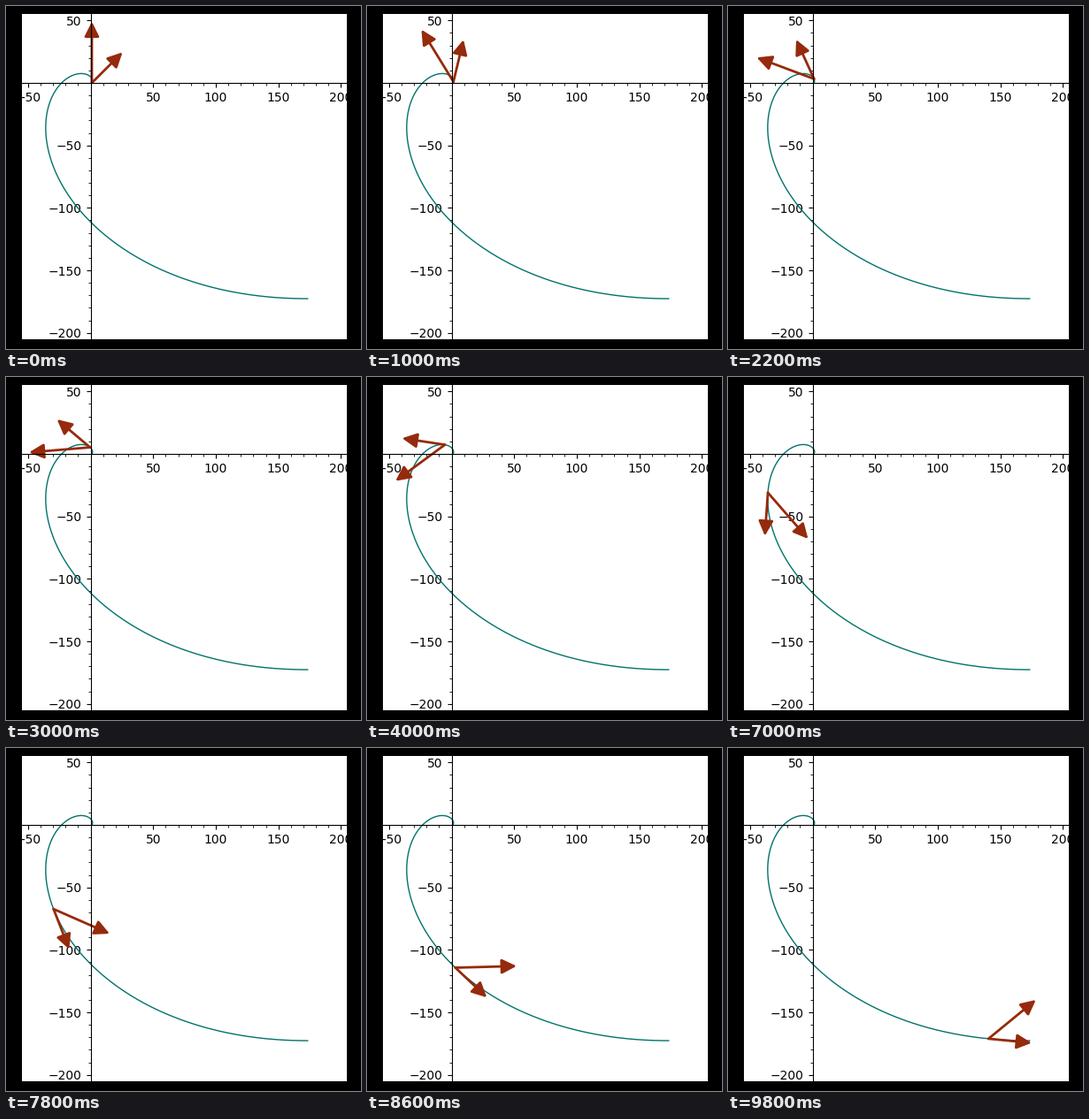
A matplotlib script for the animation above (10 s loop, 401x388 px).

```python
import numpy as np
import matplotlib.pyplot as plt
from matplotlib.animation import FuncAnimation
from matplotlib.patches import FancyArrowPatch
from matplotlib.ticker import FixedLocator, MultipleLocator

W, H, DPI = 401, 388, 100
FRAMES, INTERVAL = 50, 200
T_END, T_LAST = 5.5, 5.4
ARROW_SCALE = np.exp(T_END) / 10
CURVE_COLOR = "#00736b"
ARROW_COLOR = "#962a0c"

plt.rcParams["font.family"] = "DejaVu Sans"


def spiral(t):
    """Logarithmic spiral as a complex number."""
    return np.exp((1 + 1j) * t)


fig = plt.figure(figsize=(W / DPI, H / DPI), dpi=DPI, facecolor="black")
left, top, side = 17.8, 9.2, 367.6
ax = fig.add_axes([left / W, 1 - (top + side) / H, side / W, side / H])
ax.set_xlim(-55, 205)
ax.set_ylim(-205, 55)

# Axes crossing at the origin, without a zero label
for name in ("top", "right"):
    ax.spines[name].set_visible(False)
for name in ("left", "bottom"):
    ax.spines[name].set_position("zero")
ax.xaxis.set_major_locator(FixedLocator([-50, 50, 100, 150, 200]))
ax.yaxis.set_major_locator(FixedLocator([-200, -150, -100, -50, 50]))
for axis in (ax.xaxis, ax.yaxis):
    axis.set_minor_locator(MultipleLocator(10))
ax.tick_params(labelsize=10)

z = spiral(np.linspace(0, T_END, 500))
ax.plot(z.real, z.imag, color=CURVE_COLOR, lw=1)


def make_arrow():
    arrow = FancyArrowPatch(
        (0, 0), (1, 1), lw=2, color=ARROW_COLOR, shrinkA=0, shrinkB=0,
        arrowstyle="-|>,head_width=5,head_length=10", mutation_scale=1,
        zorder=2)
    return ax.add_patch(arrow)


velocity, acceleration = make_arrow(), make_arrow()


def update(i):
    t = T_LAST * i / (FRAMES - 1)
    start = spiral(t)
    turn = np.exp(1j * t) * ARROW_SCALE
    for arrow, factor in ((velocity, 1 + 1j), (acceleration, 2j)):
        end = start + factor * turn
        arrow.set_positions((start.real, start.imag), (end.real, end.imag))
    return velocity, acceleration


anim = FuncAnimation(fig, update, frames=FRAMES, interval=INTERVAL,
                     init_func=lambda: update(0), repeat=True,
                     repeat_delay=0, blit=False)
plt.show()
```
